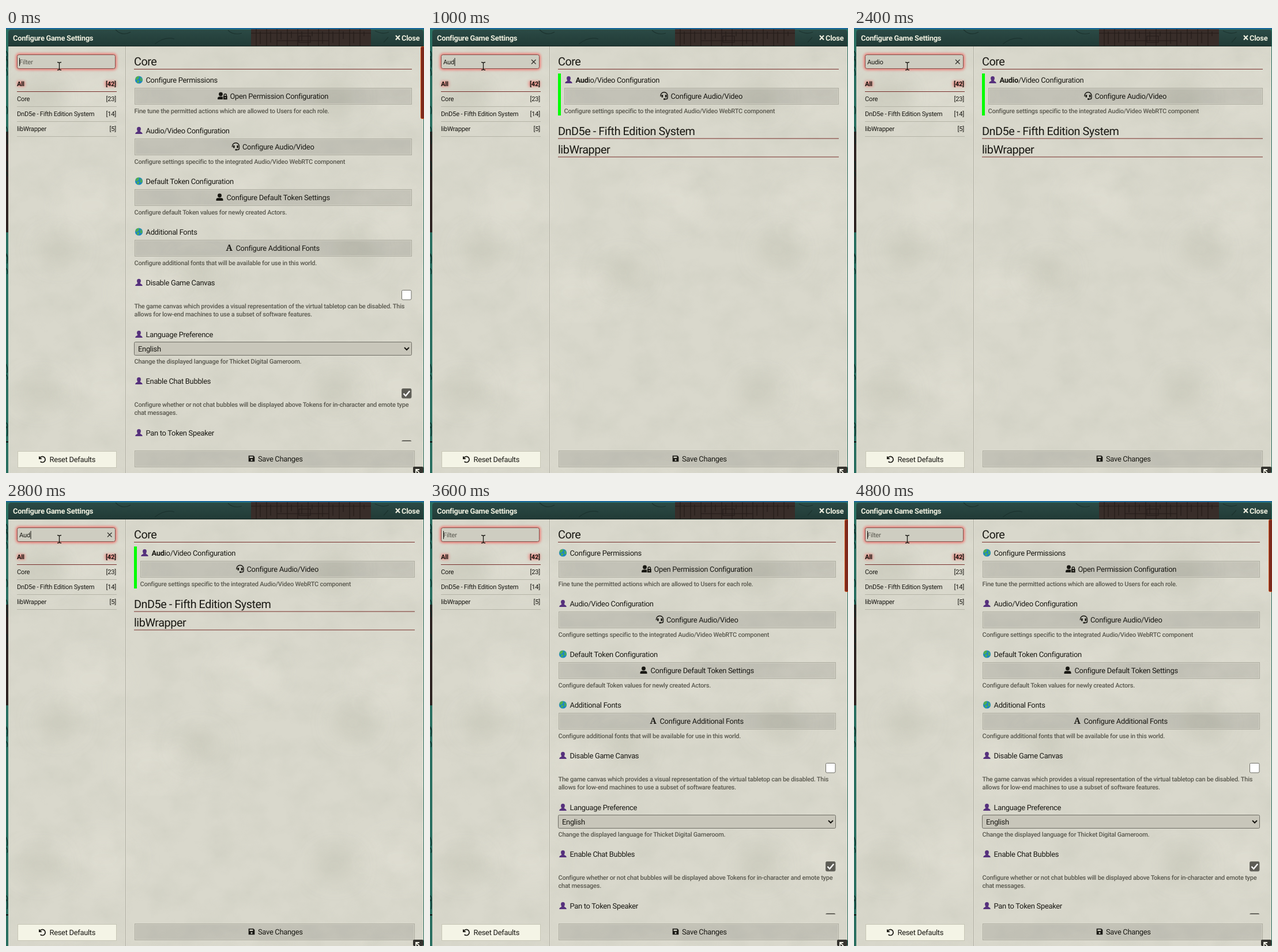
These frames come from a looping animation (725 by 773 pixels, 5 s). An HTML page:

```html
<!DOCTYPE html>
<html lang="en">
<head>
<meta charset="utf-8">
<title>Configure Game Settings</title>
<style>
html, body { margin: 0; width: 100%; height: 100%; overflow: hidden; background: #d9d7ca; }
svg { display: block; width: 725px; height: 773px; }
text { font: 12.9px Roboto, "Open Sans", sans-serif; letter-spacing: -.022em; fill: #191813; white-space: pre; text-rendering: geometricPrecision; }
.b { font-weight: 700; }
.small { font-size: 11.2px; }
.hint { font-size: 11px; font-weight: 500; fill: #5a594f; }
.head { font-size: 19.8px; }
.light { fill: #f0f0e0; font-weight: 700; }
</style>
</head>
<body>
<svg viewBox="0 0 725 773" xmlns="http://www.w3.org/2000/svg">
  <defs>
    <filter id="soft" x="-50%" y="-50%" width="200%" height="200%"><feGaussianBlur stdDeviation="16"/></filter>
    <filter id="glow" x="-20%" y="-60%" width="140%" height="220%"><feGaussianBlur stdDeviation="2"/></filter>
    <filter id="paper" x="0" y="0" width="100%" height="100%">
      <feTurbulence type="fractalNoise" baseFrequency=".02 .024" numOctaves="5" seed="8"/>
      <feColorMatrix values="0 0 0 0 .5  0 0 0 0 .51  0 0 0 0 .43  .8 0 0 0 -.3"/>
    </filter>
    <pattern id="blots" width="512" height="512" patternUnits="userSpaceOnUse"></pattern>
    <clipPath id="scroll"><rect x="208" y="32" width="511" height="686"/></clipPath>
    <linearGradient id="bar" x2="0" y2="1">
      <stop offset="0" stop-color="#2b4a45"/><stop offset="1" stop-color="#213a36"/>
    </linearGradient>
    <g id="globe">
      <circle r="6.6" fill="#1c86c4"/>
      <path d="M-5-4C-2-8 2-6 0-3C-1-1-4 1-6 0ZM-3 1C0 0 2 2 0 4L-2 6Q-4 4-3 1ZM2-5Q6-3 6 1L4 3Q1 1 3-1Z" fill="#4fae50"/>
    </g>
    <path id="person" d="M0-6.2C4.3-6.2 4-1.2 2.2 1C2.2 2.6 6 2.6 6.3 6H-6.3C-6 2.6-2.2 2.6-2.2 1C-4-1.2-4.3-6.2 0-6.2Z" fill="#56317d"/>
    <path id="user" d="M0-6.5A3.4 3.4 0 0 1 0 .4A3.4 3.4 0 0 1 0-6.5ZM-6 6V4.5Q-6 1.3-2.7 1.3H2.7Q6 1.3 6 4.5V6Z" fill="#191813"/>
    <g id="lock">
      <path d="M-3-6.5A3.4 3.4 0 0 1-3 .4A3.4 3.4 0 0 1-3-6.5ZM-8.4 6V4.5Q-8.4 1.3-5 1.3H.5V6Z" fill="#191813"/>
      <path d="M1.4 0H8.2V6.2H1.4Z" fill="#191813"/>
      <path d="M2.8 0V-1.6A2 2 0 0 1 6.8-1.6V0" fill="none" stroke="#191813" stroke-width="1.5"/>
      <circle cx="4.8" cy="3" r="1" fill="#cbc9bc"/>
    </g>
    <g id="headset" fill="none" stroke="#191813" stroke-width="1.4">
      <path d="M-6 1V-.5A6 6 0 0 1 6-.5V3Q6 5.5 3.5 5.5H0"/>
      <path d="M-3.2-2V2.6M3.2-2V2.6" stroke-width="2.6"/>
      <path d="M-1 5.5H2" stroke-width="2.4"/>
    </g>
    <text id="font" x="-5.6" y="5.2" class="b" style="font:700 15px 'Noto Serif',serif">A</text>
    <path id="save" d="M-5.3-5.3H3L5.3-3V5.3H-5.3ZM-3.5-3.7V-1H2.4V-3.7ZM0 .7A1.6 1.6 0 0 0 0 3.9A1.6 1.6 0 0 0 0 .7Z" fill="#191813" fill-rule="evenodd"/>
    <path id="undo" d="M-5.2-5.2V-1.3H-1.2M-4.6-1.8A5 5 0 1 1-3.4 3.6" fill="none" stroke="#191813" stroke-width="1.7"/>
  </defs>
  <g id="back"></g>
  <g id="live"></g>
</svg>
<script>
const $ = id => document.getElementById(id);
const rect = (x, y, w, h, fill, more = '') =>
  `<rect x="${x}" y="${y}" width="${w}" height="${h}" fill="${fill}" ${more}/>`;
const text = (x, y, s, cls = '', more = '') => `<text x="${x}" y="${y}" class="${cls}" ${more}>${s}</text>`;
const line = (x1, x2, y, color) => rect(x1, y, x2 - x1, 1, color);
const path = (d, color, width = 1) => `<path d="${d}" fill="none" stroke="${color}" stroke-width="${width}"/>`;
const icon = (name, x, y) => `<use href="#${name}" x="${x}" y="${y}"/>`;
const MAROON = '#782e2b';

let seed = 11;
const rnd = () => (seed = seed * 16807 % 2147483647) / 2147483647;

function button(x1, x2, y, glyph, glyphX, label, labelX) {
  return rect(x1, y, x2 - x1, 29, '#000', 'fill-opacity=".1"')
    + rect(x1 + .5, y + .5, x2 - x1 - 1, 28, 'none', 'stroke="#adaca0"')
    + rect(x1 + 1.5, y + 1.5, x2 - x1 - 3, 26, 'none', 'stroke="#d0cfc3"')
    + icon(glyph, glyphX, y + 14) + text(labelX, y + 18.7, label);
}

// Marked letters (~..~) turn bold when the query holds them.
function mark(s, q) {
  const keys = q.toLowerCase();
  return s.replace(/~(.+?)~/g, (_, run) => [...run].map(c =>
    keys.includes(c.toLowerCase()) ? `<tspan class="b">${c}</tspan>` : c).join(''));
}

const ROWS = [
  { y: 90, who: 'globe', name: 'Configure Permissions', btn: ['lock', 375.5, 'Open Permission Configuration', 388.5],
    hint: ['Fine tune the permitted actions which are allowed to Users for each role.'], bar: ['#fff200', 80, 152] },
  { y: 178, who: 'person', name: '~Au~dio/Video Configuration', btn: ['headset', 398.5, 'Configure Audio/Video', 410],
    hint: ['Configure settings specific to the integrated Audio/Video WebRTC component'], bar: ['#4dff00', 167, 240] },
  { y: 266, who: 'globe', name: 'Def~au~lt Token Configuration', btn: ['user', 370.5, 'Configure Default Token Settings', 382.5],
    hint: ['Configure default Token values for newly created Actors.'], bar: ['#ff7f0e', 255, 328] },
  { y: 354, who: 'globe', name: '~A~dditional Fonts', btn: ['font', 387, 'Configure Additional Fonts', 398.5],
    hint: ['Configure additional fonts that will be available for use in this world.'], bar: ['#a8ff00', 343, 416] },
  { y: 442, who: 'person', name: 'Disable Game Canvas', box: 'off',
    hint: ['The game canvas which provides ~a~ visual representation of the virtual tabletop can be disabled. This',
      'allows for low-end machines to ~u~se a subset of software features.'], bar: ['#ffcb05', 431, 506] },
  { y: 532, who: 'person', name: 'L~a~ng~u~age Preference', pick: 'English',
    hint: ['Change the displayed language for Thicket Digital Gameroom.'], bar: ['#ff6405', 520, 587] },
  { y: 613, who: 'person', name: 'En~a~ble Chat B~u~bbles', box: 'on',
    hint: ['Configure whether or not chat bubbles will be displayed above Tokens for in-character and emote type',
      'chat messages.'],
    narrow: ['Configure whether or not chat bubbles will be displayed above Tokens for in-character and emote',
      'type chat messages.'], bar: ['#f51b14', 602, 677] },
  { y: 703, who: 'person', name: 'Pan to Token Speaker', box: 'part', hint: [], bar: ['#90ff00', 692, 730] }
];

function row(r, q, dy = 0, right = 704) {
  const shift = q ? 10 : 0, y = r.y + dy, left = 223 + shift;
  let out = q ? rect(222, r.bar[1] + dy, 5, r.bar[2] - r.bar[1], r.bar[0]) : '';
  out += icon(r.who, 230.5 + shift, y) + text(242.5 + shift, y + 4.6, mark(r.name, q));
  let hintY = y + 57.7;
  if (r.btn) {
    const [glyph, gx, label, lx] = r.btn, mid = shift / 2 + (right - 704) / 2;
    out += button(left, right, y + 14, glyph, gx + mid, label, lx + mid);
  }
  if (r.pick) {
    out += rect(left - .5, y + 13.5, 481 - shift, 23, '#c8c6ba', 'rx="2" stroke="#6f6e65"')
      + text(left + 6, y + 29.5, r.pick) + path(`M691 ${y + 23}l4 4l4-4`, '#191813', 2);
    hintY = y + 50.7;
  }
  if (r.box) {
    const on = r.box === 'on';
    out += rect(686.5, y + 13.5, 16.5, 16.5, on || r.box === 'part' ? '#5d5c55' : '#fff', 'rx="2" stroke="#6f6e66"');
    if (on) out += path(`M689.5 ${y + 22}l3.7 4l7-8.5`, '#fff', 2.4);
    hintY = y + 44.5;
  }
  const lines = q && r.narrow || r.hint;
  return out + lines.map((s, i) => text(left - .5, hintY + i * 14.6, mark(s, q), 'hint')).join('');
}

function heading(s, y, right) {
  return text(222, y, s, 'head') + line(222, right, y + 6, MAROON);
}

function content(q) {
  if (q.length < 3) {
    const end = q ? 280 : 158;
    return `<g clip-path="url(#scroll)">${heading('Core', 65, 704)}${ROWS.map(r => row(r, q)).join('')}</g>`
      + rect(719.5, 32.5, 8, end - 33, '#7d2a1d', 'rx="2" stroke="#d2551f"');
  }
  const found = { ...ROWS[1], name: `<tspan class="b">${q}</tspan>${'Audio'.slice(q.length)}/Video Configuration`,
    bar: ['#00ff00', 167, 240] };
  return heading('Core', 65, 709) + row(found, q, -88, 709)
    + heading('DnD5e - Fifth Edition System', 185.5, 709) + heading('libWrapper', 217.5, 709);
}

// Map edges, parchment, title bar, sidebar and footer never change.
function backdrop() {
  let blots = '';
  for (const [x, y] of [[58, 122], [335, 425], [90, 385]])
    blots += `<ellipse cx="${x}" cy="${y}" rx="38" ry="30" fill="#b2b4a2" opacity=".28" filter="url(#soft)"/>`;
  for (const [x, y] of [[170, 110], [250, 460], [420, 300], [150, 310]])
    blots += `<ellipse cx="${x}" cy="${y}" rx="60" ry="45" fill="#ebe8dd" opacity=".25" filter="url(#soft)"/>`;
  $('blots').innerHTML = blots;

  let out = rect(0, 0, 725, 773, '#2a6f61') + rect(0, 0, 725, 2, '#1b689c') + rect(0, 180, 5, 175, '#2f2523');
  for (let i = 0; i < 16; i++) {
    const y = 40 + rnd() * 680;
    out += path(`M0 ${y}q4 ${rnd() * 8} 2 ${8 + rnd() * 10}`, '#142f2b', 1.2);
  }
  out += rect(0, 718, 5, 2, '#111') + rect(425, 2, 208, 30, '#4b3830');
  out += rect(4, 31, 720, 742, '#d9d8cc') + rect(4, 31, 720, 742, 'url(#blots)')
    + rect(4, 31, 720, 742, '#fff', 'filter="url(#paper)" opacity=".5"');

  out += `<path d="M4 32V8Q4 3 9 3H720Q724 3 724 8V32Z" fill="url(#bar)"/>` + rect(425, 3, 208, 28, '#382d29');
  for (let x = 434; x < 630; x += 18) out += path(`M${x} 2V31M${x + 7} 6V${14 + rnd() * 14}`, '#251d1a', 1.2);
  out += path('M425 9H633M470 22H560M508 14H528V25H508Z', '#251d1a', 1.1)
    + path('M190 3q12 12 26 4M258 28q18-14 34-9M385 4q9 9 24 5M655 25l8-9M640 5q14 7 24 2', '#1c332f', 1.2)
    + line(4, 724, 31, '#172823');
  out += text(12, 21.5, 'Configure Game Settings', 'light') + text(686, 21.5, 'Close', 'light')
    + path('M676 13l7 7.500M683 13l-7 7.500', '#f0f0e0', 2.2);

  out += rect(207, 32, 1, 741, '#aeada1') + rect(208, 32, 1, 741, '#e5e3d8');
  const tabs = [['Core', '[23]'], ['DnD5e - Fifth Edition System', '[14]'], ['libWrapper', '[5]']];
  out += `<g filter="url(#glow)" opacity=".4">${rect(19, 92, 14, 10, '#f33')}${rect(171, 92, 20, 10, '#f33')}</g>`
    + text(19, 101.3, 'All', 'small b') + text(191, 101.3, '[42]', 'small b', 'text-anchor="end"') + line(19, 192, 110, MAROON);
  tabs.forEach(([name, n], i) => {
    const y = 127.3 + i * 26;
    out += text(19, y, name, 'small') + text(191, y, n, 'small', 'text-anchor="end"') + line(19, 192, 136 + i * 26, '#b4b3a6');
  });

  out += rect(19.5, 46.5, 170, 24, 'none', 'rx="3" stroke="#f22" stroke-width="4" opacity=".65" filter="url(#glow)"')
    + rect(19.5, 46.5, 170, 24, '#cecdc1', 'rx="3" stroke="#81504b"');
  out += rect(20.5, 735.5, 171, 28, '#f4f4e6', 'stroke="#c7c6b6"') + icon('undo', 63, 749.5) + text(75.5, 753.7, 'Reset Defaults')
    + button(223, 709, 734, 'save', 426, 'Save Changes', 437);
  out += rect(706, 762, 18, 11, '#35342f', 'rx="2"') + path('M711 773V767H717M711 767l6 6', '#f2f2e6', 1.8);
  return out;
}

function render(q, caret) {
  const caretX = [23, 30, 36, 42.5, 45, 50][q.length];
  $('live').innerHTML = content(q)
    + text(23, 62.7, q || 'Filter', 'small', q ? '' : 'style="fill:#5a5950"')
    + (caret ? rect(caretX, 52, 1, 14, '#191813') : '')
    + (q ? path('M176 55l7.500 7.500M183.500 55l-7.500 7.500', '#33322d', 1.3) : '')
    + path('M89 59.500q3 0 3.500 1.500q.5-1.500 3.500-1.500M92.500 61V71.500M89 73q3 0 3.500-1.500q.5 1.500 3.500 1.500', '#191813', 1.3);
}

// time, typed letters, caret shown
const STEPS = [
  [0, 0, 1], [400, 0, 0], [600, 1, 1], [800, 2, 1], [1000, 3, 1], [1400, 4, 1], [1600, 5, 1],
  [2200, 5, 0], [2600, 4, 1], [2800, 3, 1], [3000, 2, 1], [3200, 2, 0], [3400, 1, 1],
  [3600, 0, 1], [4400, 0, 0], [4800, 0, 1]
];
const LOOP = 5000, start = performance.now();
let shown = null;

function tick() {
  const t = (performance.now() - start) % LOOP;
  const step = STEPS.findLast(s => s[0] <= t);
  if (step !== shown) {
    shown = step;
    render('Audio'.slice(0, step[1]), step[2]);
  }
  requestAnimationFrame(tick);
}

$('back').innerHTML = backdrop();
tick();
</script>
</body>
</html>
```
